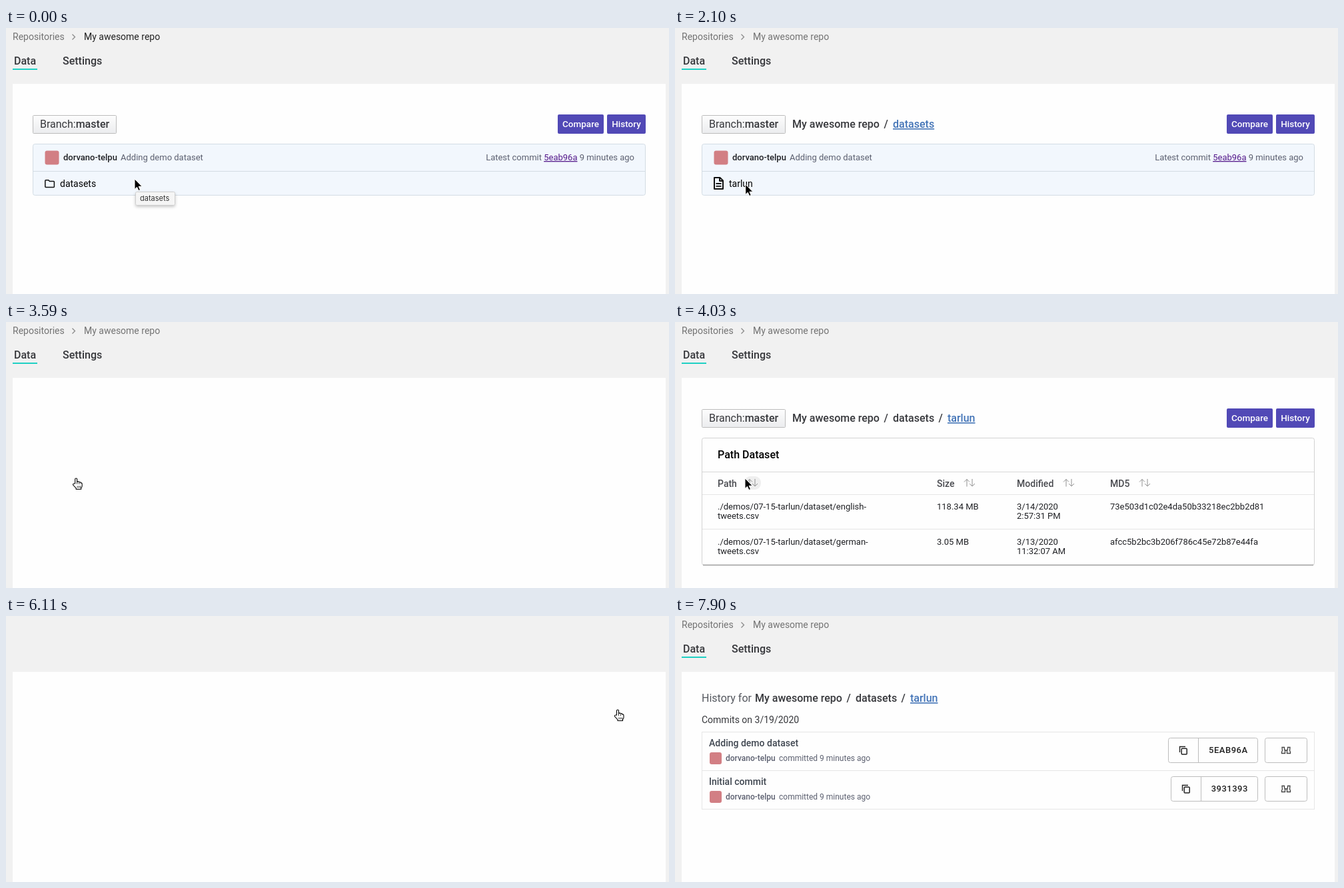
Animation, 995 px wide and 400 px high, one loop 8190 ms. Source, as an HTML page:

```html
<!DOCTYPE html>
<html lang="en">
<head>
<meta charset="utf-8">
<title>Repository browser</title>
<style>
  html, body { margin: 0; width: 100%; height: 100%; overflow: hidden; background: #f1f1f1; }
  svg { display: block; }
  text { font-family: Roboto, sans-serif; white-space: pre; }
</style>
</head>
<body>
<svg id="stage" width="995" height="400" viewBox="0 0 995 400"></svg>
<script>
const LOOP = 8190, TICK = 148.8;
const USER = 'dorvano-telpu', DATASET = 'tarlun';
const INK = '#37383c', MUTED = '#5c6070', LINK = '#4374b7', PINK = '#d27f84';

// Markup helpers
const text = (x, y, str, size = 14, fill = INK, weight = 400, extra = '') =>
  `<text x="${x}" y="${y}" font-size="${size}" fill="${fill}" font-weight="${weight}" ${extra}>${str}</text>`;
const box = (x, y, w, h, fill, stroke = 'none', r = 0, extra = '') =>
  `<rect x="${x}" y="${y}" width="${w}" height="${h}" rx="${r}" fill="${fill}" stroke="${stroke}" ${extra}/>`;
const line = (d, stroke, width = 1, extra = '') =>
  `<path d="${d}" fill="none" stroke="${stroke}" stroke-width="${width}" ${extra}/>`;
const group = (id, body) => `<g id="${id}">${body}</g>`;
const UNDERLINE = 'text-decoration="underline"';

function crumbs(x, y, parts) {
  const starts = [0, 151, 233], slashes = [137.5, 219.5];
  return parts.map((part, i) => {
    const last = i === parts.length - 1;
    return text(x + starts[i], y, part, 16, last ? LINK : INK, 500, last ? UNDERLINE : '') +
      (last ? '' : text(x + slashes[i], y, '/', 16, INK, 500));
  }).join('');
}

const header =
  text(10, 18, 'Repositories', 14, '#737373') +
  line('M99.5 9.5l4 4-4 4', '#8a8a8a', 1.3) +
  text(117, 18, 'My awesome repo', 14, '#737373', 400, 'id="title"') +
  text(12, 55, 'Data', 16, INK, 500) +
  text(85, 55, 'Settings', 16, INK, 500) +
  box(10, 61, 37, 2, '#1fd0c4');

const toolbar =
  box(40.5, 131.5, 125, 27, 'url(#fade)', '#bcbcbc', 1) +
  text(51, 150, 'Branch:<tspan font-weight="500">master</tspan>', 16) +
  box(828, 130, 69, 29, '#5149b6', 'none', 2, 'id="compare"') +
  text(862.5, 149, 'Compare', 13.5, '#fff', 500, 'text-anchor="middle"') +
  box(902, 130, 58, 29, '#5149b6', 'none', 2, 'id="history"') +
  text(931, 149, 'History', 13.5, '#fff', 500, 'text-anchor="middle"');

const listing =
  box(40.5, 174.5, 919, 77, '#f2f7fd', '#d3dce4', 3) +
  line('M41 215.5H959', '#d3dce4') +
  box(58.5, 184.5, 21, 21, PINK, 'none', 3) +
  text(86, 199, USER, 13, '#1f2024', 500) +
  text(172, 199, 'Adding demo dataset', 13, MUTED) +
  text(943, 199, `Latest commit <tspan fill="#551a8b" ${UNDERLINE}>5eab96a</tspan> 9 minutes ago`,
    13, MUTED, 400, 'text-anchor="end"');

const folderRow =
  line('M58.8 229.8q0-1 1-1h4l1.6 1.7h6q1 0 1 1v7q0 1-1 1h-11.6q-1 0-1-1z', '#111', 1.5) +
  text(81, 239, 'datasets', 14, '#000', 400, 'id="folder"');

const fileRow =
  crumbs(176, 150, ['My awesome repo', 'datasets']) +
  line('M59 225h8.500l4.500 4.500v12.500h-13zM67 225v5h5', '#111', 2, 'stroke-linejoin="round"') +
  line('M61.5 234h8M61.5 237.8h8', '#111', 1.8) +
  text(81, 239, DATASET, 14, '#000', 400, 'id="file"');

const sortIcon = x =>
  line(`M${x + 5} 247.5v-11m-4 4l4-4 4 4M${x + 13} 236v11m-4-4l4 4 4-4`, '#909090', 1);

function fileEntry(y, kind, size, date, time, hash) {
  const cell = (x, dy, str) => text(x, y + dy, str, 13, '#1f2024');
  return cell(64, 0, `./demos/07-15-${DATASET}/dataset/${kind}-`) + cell(64, 14, 'tweets.csv') +
    cell(393, 0, size) + cell(513, 0, date) + cell(513, 14, time) + cell(653, 0, hash);
}

const detail =
  crumbs(176, 150, ['My awesome repo', 'datasets', DATASET]) +
  box(40.5, 174.5, 919, 191, '#fefefe', '#d2d2d2', 3) +
  line('M42 365.5H958', '#9c9c9c', 1.4) +
  text(64, 205, 'Path Dataset', 16, '#000', 500) +
  line('M41 225.5H959', '#d8d8d8') + line('M41 259.5H959M41 311.5H959', '#e6e6e6') +
  box(104, 232, 25, 20, '#efefef', 'none', 9, 'id="sortHover"') +
  [['Path', 64, 107], ['Size', 393, 433], ['Modified', 513, 582], ['MD5', 653, 696]]
    .map(([label, x, icon]) => text(x, 248, label, 14, '#4a4b50', 500) + sortIcon(icon)).join('') +
  fileEntry(282, 'english', '118.34 MB', '3/14/2020', '2:57:31 PM', '73e503d1c02e4da50b33218ec2bb2d81') +
  fileEntry(335, 'german', '3.05 MB', '3/13/2020', '11:32:07 AM', 'afcc5b2bc3b206f786c45e72b87e44fa');

function commit(y, left, title, hash) {
  const split = left + 45, icon = left + 17;
  return text(51, y + 22, title, 14, '#3f4650', 500) +
    box(52, y + 31, 18, 18, PINK, 'none', 3) +
    text(76, y + 44, USER, 12, MUTED, 500) +
    text(156, y + 44, 'committed 9 minutes ago', 12, MUTED) +
    box(left + .5, y + 9.5, 874 - left, 37, '#fefefe', '#bdbdbd', 3) +
    line(`M${split + .5} ${y + 10}v36`, '#bdbdbd') +
    line(`M${icon + .5} ${y + 31}v-8.5h8.5`, '#222', 1.4) +
    box(icon + 3.2, y + 25.2, 8, 8.7, 'none', '#222', 1, 'stroke-width="1.5"') +
    text((split + 875) / 2 + .3, y + 32, hash, 13, '#222', 500, 'text-anchor="middle" letter-spacing=".5"') +
    box(885.5, y + 9.5, 63, 37, '#fefefe', '#bdbdbd', 3) +
    line(`M911 ${y + 23.5}h3.5v3l1 1v5h-5v-2l1-2zM923 ${y + 23.5}h-3.5v3l-1 1v5h5v-2l-1-2zM914.5 ${y + 28}h5`,
      '#444', 1.3);
}

const log =
  text(40, 129, 'History for', 16, '#55585f') +
  crumbs(120, 129, ['My awesome repo', 'datasets', DATASET]) +
  text(40, 161, 'Commits on 3/19/2020', 14) +
  box(40.5, 174.5, 919, 116, '#fefefe', '#e6e6e6') +
  line('M41 232.5H959', '#e6e6e6') +
  commit(174, 740, 'Adding demo dataset', '5EAB96A') +
  commit(232, 744, 'Initial commit', '3931393');

const tooltip =
  box(194.5, 246.5, 59, 20, '#f5f5f5', '#cfcfcf', 2, 'filter="url(#shadow)"') +
  text(201, 260, 'datasets', 11, '#333', 400, 'style="font-family:Inter,sans-serif"');

const loader = '<circle id="green" r="6" cy="129.5" fill="#5fe3c6"/><circle id="violet" r="6" cy="129.5" fill="#6b63ff"/>';

const arrow = '<path d="M0 0v15.5l3.5-3.2 2.4 5.3 2.6-1.1-2.4-5.2h5z" fill="#000" stroke="#fff"/>';
const hand = '<path d="M-1.5 8V1.5Q-1.5 0 0 0T1.5 1.5V5.5Q3.5 4 4.5 6 6.5 5 7 7 9 6.5 9 9V11.5Q9 13 7.5 14.5V16.5H0V15L-4.5 10Q-5 8-3 8Z" fill="#fff" stroke="#000" stroke-width="1.1"/>' +
  line('M1.5 6v3M4.5 7v2M2 11.5v3M4.2 11.5v3M6.3 11.5v3', '#000', .8);

const stage = document.getElementById('stage');
stage.innerHTML = `<defs>
  <linearGradient id="fade" x2="0" y2="1"><stop stop-color="#fdfdfd"/><stop offset="1" stop-color="#ebecee"/></linearGradient>
  <filter id="shadow" x="-20%" y="-40%" width="140%" height="200%"><feDropShadow dx="0" dy="2" stdDeviation="2" flood-opacity=".22"/></filter>
  </defs>` +
  box(0, 0, 995, 400, '#f1f1f1') + box(10, 84, 980, 316, '#fefefe') +
  group('header', header) + group('toolbar', toolbar) + group('listing', listing) +
  group('folderRow', folderRow) + group('fileRow', fileRow) + group('detail', detail) +
  group('log', log) + group('loader', loader) + group('tooltip', tooltip) +
  group('cursor', group('arrow', arrow) + group('hand', hand));

const ui = {};
stage.querySelectorAll('[id]').forEach(el => ui[el.id] = el);
const show = (id, on) => ui[id].style.display = on ? '' : 'none';
const underline = (id, on) => ui[id].setAttribute('text-decoration', on ? 'underline' : 'none');

// Pointer path: tick, x, y
const path = [
  [0, 193, 227], [5, 193, 227], [7, 150, 236], [9, 108, 236], [10, 106, 235],
  [27, 105, 235], [30, 105, 235], [31, 112, 230], [33, 400, 180], [35, 850, 121],
  [36, 887, 146], [37, 905, 145], [38, 918, 141], [48, 918, 141], [50, 936, 215], [52, 971, 363]
];

function pointerAt(tick) {
  const i = path.findIndex(p => p[0] > tick);
  if (i < 0) return path[path.length - 1].slice(1);
  const [t0, x0, y0] = path[i - 1], [t1, x1, y1] = path[i];
  const k = (tick - t0) / (t1 - t0);
  return [x0 + (x1 - x0) * k, y0 + (y1 - y0) * k];
}

function render(ms) {
  const tick = Math.min(54, Math.floor(ms / TICK));
  const within = (from, to) => tick >= from && tick < to;
  const inFolder = within(0, 12), inFile = within(14, 24), inDetail = within(27, 41);
  const overCompare = within(35, 37), overHistory = within(37, 41);
  const onFolder = within(9, 12), onFile = within(15, 24);

  show('header', !within(41, 43));
  ui.title.setAttribute('fill', inFolder ? '#222' : '#737373');
  show('toolbar', inFolder || inFile || inDetail);
  show('listing', inFolder || inFile);
  show('folderRow', inFolder);
  show('fileRow', inFile);
  show('detail', inDetail);
  show('log', tick >= 46);
  show('tooltip', tick < 6);
  show('sortHover', tick < 32);
  underline('folder', onFolder);
  underline('file', onFile);
  ui.compare.setAttribute('fill', overCompare ? '#37327d' : '#5149b6');
  ui.history.setAttribute('fill', overHistory ? '#37327d' : '#5149b6');

  show('loader', within(43, 46));
  const swing = 7.8 * Math.cos((tick - 45) * Math.PI / 3);
  ui.green.setAttribute('cx', 492.2 - swing);
  ui.violet.setAttribute('cx', 492.2 + swing);

  const pointing = within(9, 13) || within(15, 25) || within(35, 42);
  show('hand', pointing);
  show('arrow', !pointing);
  show('cursor', tick < 53);
  ui.cursor.setAttribute('transform', `translate(${pointerAt(tick)})`);
}

function loop() {
  render(performance.now() % LOOP);
  requestAnimationFrame(loop);
}
loop();
</script>
</body>
</html>
```
